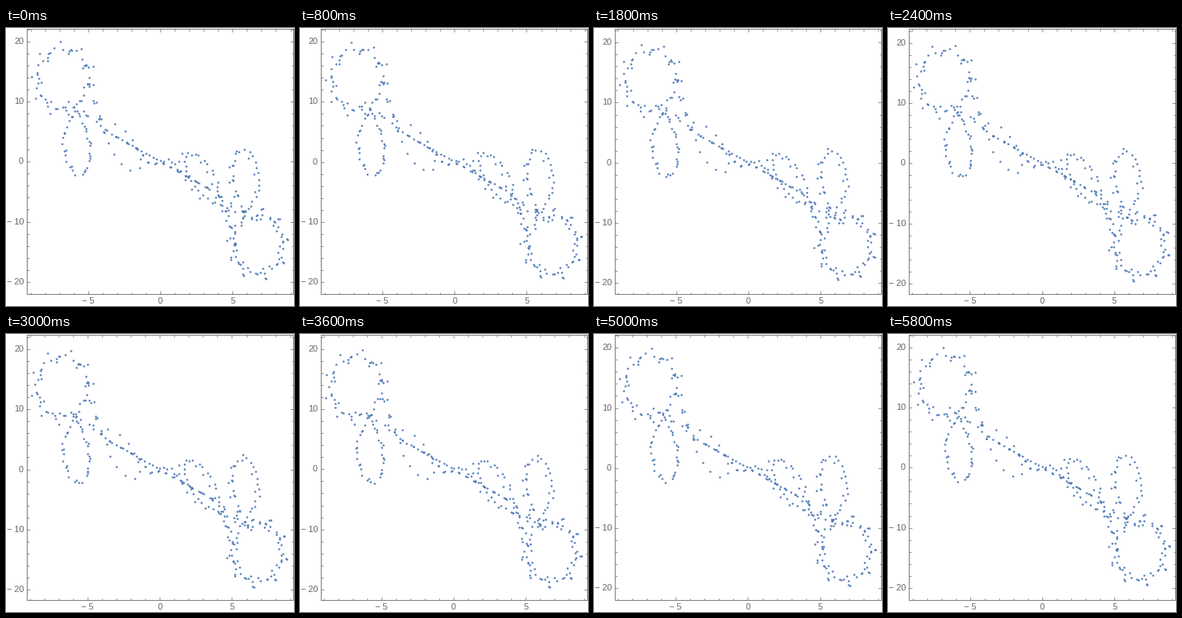
Recreate the animation shown at these times as a matplotlib script. Size 360 px wide and 348 px high, loop 6000 ms.

```python
import numpy as np
import matplotlib.pyplot as plt
from matplotlib.animation import FuncAnimation
from matplotlib.collections import LineCollection
from matplotlib.patches import Rectangle

W, H, DPI = 360, 348, 100
FRAMES, INTERVAL = 30, 200
POINTS = 330
LEFT, TOP, RIGHT, BOTTOM = 26.2, 1.2, 359.2, 333.2
SX, SY = 18.05, 7.53
GRAY, BLUE = "#666666", "#4c78b6"

# Turns round each lobe: P passes the centre, A makes a small arc, T a tall hook.
ROUTE = [(1, "PATAT"), (-1, "PTT"), (1, "PTAT"), (-1, "PATT")]

rng = np.random.default_rng(8)


def oval(cx, cy, rx, ry, start, stop, count, slope=0):
    a = np.radians(np.linspace(start, stop, count))
    return np.column_stack([cx + rx * np.cos(a),
                            cy + ry * np.sin(a) - slope * np.cos(a)])


def entry(kind):
    dx, dy = rng.normal(0, [.12, .25])
    if kind == "T":
        return oval(5.75 + dx, -2.5 + dy, .9, 4.6, 215, -20, 9, slope=.9)
    if kind == "A":
        return oval(2.75 + dx, -2.4 + dy, 1.2, 3, 300, 0, 11, slope=2.6)
    x = np.linspace(-3.4, 4, 19)
    bump = rng.uniform(.4, 1.9)
    return np.column_stack([x, -1.35 * x + bump * np.exp(-((x - .7) / .5) ** 2)])


def lobe():
    r = rng.uniform(.64, 1.03)
    return oval(6.75, -13.7, 2.15 * r, 6.1 * r, 165, 475, 11)


def smooth(p, steps=20):
    """Dense closed Catmull-Rom curve."""
    f = np.linspace(0, 1, steps, endpoint=False)[None, :, None]
    a, b, c, d = (np.roll(p, -k, axis=0)[:, None] for k in (-1, 0, 1, 2))
    q = b + .5 * f * (c - a + f * (2 * a - 5 * b + 4 * c - d
                                   + f * (3 * (b - c) + d - a)))
    return q.reshape(-1, 2)


def build_path():
    turns = [side * np.concatenate([entry(kind), lobe()])
             for side, kinds in ROUTE for kind in kinds]
    path = smooth(np.concatenate(turns)) * [SX, -SY]
    path = np.vstack([path, path[:1]])
    # Travel slows down towards the centre.
    speed = 6 + .07 * np.hypot(*path[1:].T)
    step = np.hypot(*np.diff(path, axis=0).T) / speed
    clock = np.concatenate([[0], np.cumsum(step)])
    return clock / clock[-1], path


CLOCK, PATH = build_path()


def positions(t):
    u = (np.arange(POINTS) + t) / POINTS
    return np.column_stack([np.interp(u, CLOCK, PATH[:, k]) for k in (0, 1)])


def origin(t):
    x = 192.65 + .6 * np.cos(2 * np.pi * (t - .13))
    y = 168.4 - 1.15 * np.cos(2 * np.pi * t)
    return x, y


def tick_segments(x0, y0):
    segs = []
    for v in range(-9, 10):
        x, n = x0 + v * SX, 4 if v % 5 == 0 else 2.4
        segs += [[(x, BOTTOM), (x, BOTTOM - n)], [(x, TOP), (x, TOP + n)]]
    for v in range(-20, 23, 2):
        y, n = y0 - v * SY, 4 if v % 10 == 0 else 2.4
        if TOP < y < BOTTOM:
            segs += [[(LEFT, y), (LEFT + n, y)], [(RIGHT, y), (RIGHT - n, y)]]
    return segs


def caption(v):
    return f"\u2212 {-v}" if v < 0 else str(v)


fig = plt.figure(figsize=(W / DPI, H / DPI), dpi=DPI, facecolor="white")
ax = fig.add_axes([0, 0, 1, 1])
ax.set_xlim(0, W)
ax.set_ylim(H, 0)
ax.axis("off")
ax.add_patch(Rectangle((LEFT, TOP), RIGHT - LEFT, BOTTOM - TOP,
                       fill=False, ec=GRAY, lw=.6))
ticks = ax.add_collection(LineCollection([], colors=GRAY, linewidths=.5))
dots = ax.scatter([], [], s=3.2, c=BLUE, linewidths=0, zorder=3)
font = dict(family="Liberation Sans", size=7.9, color=GRAY)
xlabels = {v: ax.text(0, 341.7, caption(v), ha="center", va="center", **font)
           for v in (-5, 0, 5)}
ylabels = {v: ax.text(22.2, 0, caption(v), ha="right", va="center", **font)
           for v in range(-20, 21, 10)}


def draw(frame):
    t = frame / FRAMES
    x0, y0 = origin(t)
    dots.set_offsets(positions(t) + [x0, y0])
    ticks.set_segments(tick_segments(x0, y0))
    for v, label in xlabels.items():
        label.set_x(x0 + v * SX)
    for v, label in ylabels.items():
        label.set_y(y0 - v * SY)
    return [dots, ticks, *xlabels.values(), *ylabels.values()]


anim = FuncAnimation(fig, draw, frames=FRAMES, interval=INTERVAL,
                     repeat=True, repeat_delay=0, blit=False)
plt.show()
```
